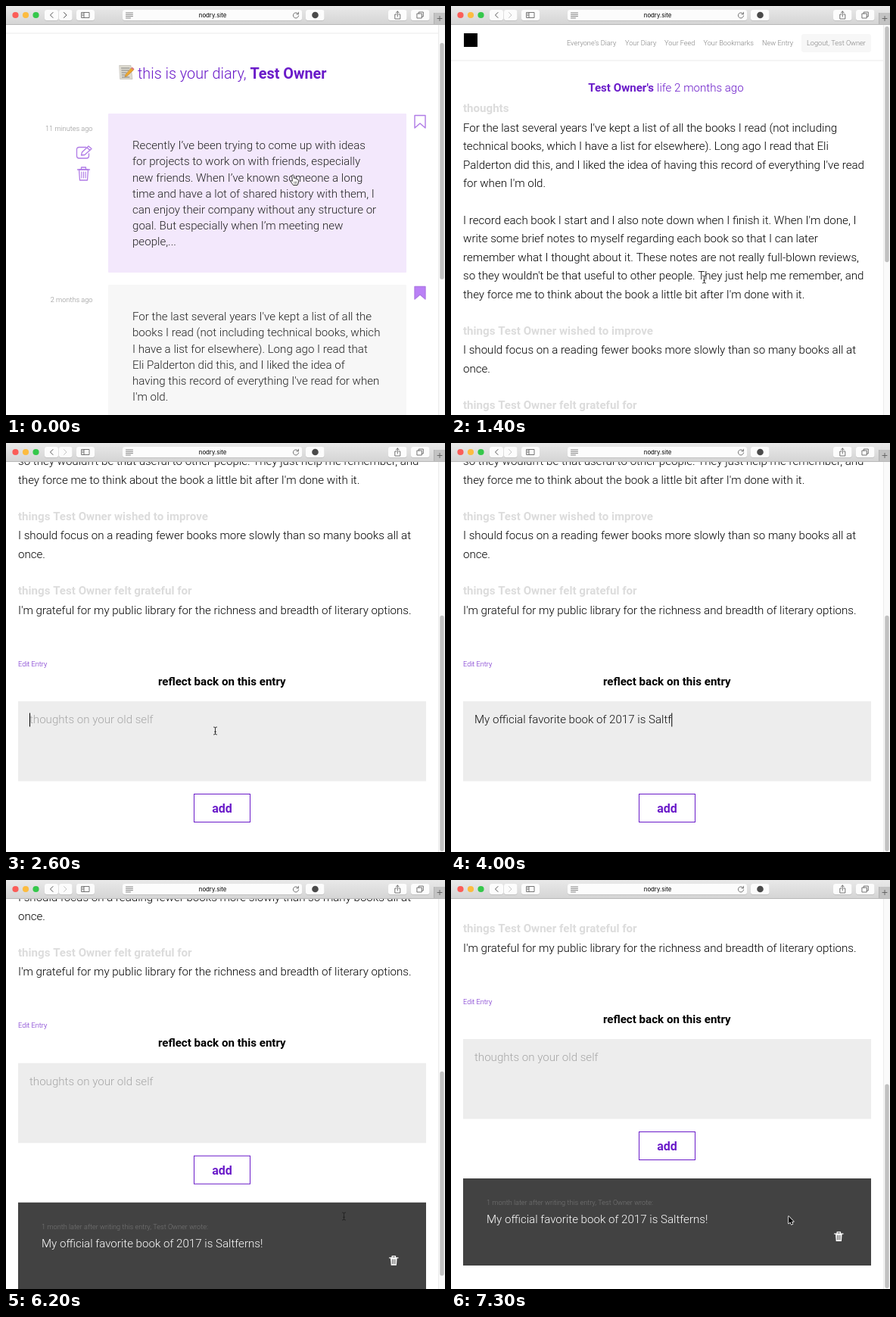
Write an HTML page with a canvas that moves like this. It is 580 by 540 pixels and loops after 7.4 s.

```html
<!DOCTYPE html>
<html lang="en">
<head>
<meta charset="utf-8">
<title>Diary demo</title>
<style>
html, body { margin: 0; width: 100%; height: 100%; overflow: hidden; background: #fff; }
canvas { display: block; width: 580px; height: 540px; }
</style>
</head>
<body>
<canvas id="stage"></canvas>
<script>
const W = 580, H = 540, LOOP = 7400, STEP = 100, TOP = 25, PAGE_W = 571;
const canvas = document.getElementById('stage');
const ctx = canvas.getContext('2d');
const dpr = window.devicePixelRatio || 1;
canvas.width = W * dpr;
canvas.height = H * dpr;

const USER = 'Test Owner', TITLE = 'Saltferns';
const PURPLE = '#6a1bc9', LILAC = '#b07be6', SIZE = 15.1, SMALL = 9.2;
const NOTE = `My official favorite book of 2017 is ${TITLE}!`;
const PLACEHOLDER = 'thoughts on your old self';

const DIARY = [
  { y: 178, h: 210, age: '11 minutes ago', saved: false, lines: [
    'Recently I’ve been trying to come up with ideas',
    'for projects to work on with friends, especially',
    'new friends. When I’ve known someone a long',
    'time and have a lot of shared history with them, I',
    'can enjoy their company without any structure or',
    'goal. But especially when I’m meeting new',
    'people,...'] },
  { y: 404, h: 189, age: '2 months ago', saved: true, lines: [
    "For the last several years I've kept a list of all the",
    'books I read (not including technical books, which',
    'I have a list for elsewhere). Long ago I read that',
    'Eli Palderton did this, and I liked the idea of',
    "having this record of everything I've read for when",
    "I'm old."] }
];
const THOUGHTS = [
  "For the last several years I've kept a list of all the books I read (not including",
  'technical books, which I have a list for elsewhere). Long ago I read that Eli',
  "Palderton did this, and I liked the idea of having this record of everything I've read",
  "for when I'm old.",
  '',
  "I record each book I start and I also note down when I finish it. When I'm done, I",
  'write some brief notes to myself regarding each book so that I can later',
  'remember what I thought about it. These notes are not really full-blown reviews,',
  "so they wouldn't be that useful to other people. They just help me remember, and",
  "they force me to think about the book a little bit after I'm done with it."
];

const DIARY_SCROLL = [[0, 36], [400, 76]];
const ENTRY_SCROLL = [[1600, 0], [2300, 332], [5800, 332], [6400, 466], [6600, 463]];
const POINTER = [
  [0, 380, 229], [200, 380, 229], [700, 334, 361], [1600, 334, 361],
  [2300, 276, 380], [5000, 276, 380], [5400, 300, 484], [5700, 306, 484],
  [5800, 366, 459], [6200, 446, 444]
];

// Eased value of column c in a list of [time, value, ...] keys.
function track(keys, t, c = 1) {
  if (t <= keys[0][0]) return keys[0][c];
  for (let i = 1; i < keys.length; i++) {
    const a = keys[i - 1], b = keys[i];
    if (t < b[0]) {
      const p = (t - a[0]) / (b[0] - a[0]);
      return a[c] + (b[c] - a[c]) * p * p * (3 - 2 * p);
    }
  }
  return keys[keys.length - 1][c];
}

const clamp = (v, lo, hi) => Math.min(hi, Math.max(lo, v));

// Text is placed by the middle of its capitals.
function text(s, x, mid, { size = SIZE, weight = 300, color = '#000', align = 'left', family = 'Roboto' } = {}) {
  ctx.font = `${weight} ${size}px ${family}, sans-serif`;
  ctx.textAlign = align;
  ctx.fillStyle = color;
  ctx.fillText(s, x, mid + size * 0.355);
  return ctx.measureText(s).width;
}

function rect(x, y, w, h, fill, r = 0) {
  ctx.fillStyle = fill;
  ctx.beginPath();
  ctx.roundRect(x, y, w, h, r);
  ctx.fill();
}

function disc(x, y, r, fill) {
  ctx.fillStyle = fill;
  ctx.beginPath();
  ctx.arc(x, y, r, 0, 7);
  ctx.fill();
}

function shape(d, x, y, { fill, stroke, width = 1 } = {}) {
  const path = new Path2D(d);
  ctx.save();
  ctx.translate(x, y);
  ctx.lineJoin = ctx.lineCap = 'round';
  if (fill) { ctx.fillStyle = fill; ctx.fill(path); }
  if (stroke) { ctx.strokeStyle = stroke; ctx.lineWidth = width; ctx.stroke(path); }
  ctx.restore();
}

function drawToolbar(entryOpen) {
  const bar = ctx.createLinearGradient(0, 0, 0, TOP);
  bar.addColorStop(0, '#e9e9e9');
  bar.addColorStop(1, '#d4d4d4');
  rect(0, 0, W, TOP, bar);
  rect(0, 24, W, 1, '#b9b9b9');
  ['#fb5d58', '#fcbc40', '#35c84b'].forEach((c, i) => disc(12.5 + i * 13.5, 12, 4.1, c));

  [[51, 18], [70, 17.5], [93, 24], [154, 237], [396, 24.5], [505, 24.5], [535, 24.5]].forEach(([x, w]) => {
    rect(x, 5.5, w, 14.5, '#c2c2c2', 3);
    rect(x, 5, w, 14, '#fcfcfc', 3);
  });
  const line = { stroke: '#555', width: 1 };
  shape('M2 -3.5L-1.5 0L2 3.5', 60, 12, line);
  shape('M-2 -3.5L1.5 0L-2 3.5', 78.5, 12, { stroke: entryOpen ? '#c4c4c4' : '#555' });
  shape('M-5 -3.5H5V3.5H-5ZM-2 -3.5V3.5M-4 -1.5H-3M-4 .5H-3', 105, 12, { stroke: '#666', width: 0.9 });
  shape('M0 0H9M0 2.3H9M0 4.6H9M0 6.9H6', 158.5, 9, { stroke: '#777', width: 0.9 });
  shape('M3.2 -1.6A3.6 3.6 0 1 0 3.6 .6M3.4 -4V-1.4H.9', 383, 12.3, { stroke: '#666', width: 0.9 });
  text('nodry.site', 273, 12.2, { size: 7.8, weight: 400, align: 'center', family: 'Inter' });
  disc(408.5, 12, 4.3, '#4a4a4a');
  shape('M-1.5 -1H-3.5V5H3.5V-1H1.5M0 2V-5M-2 -3L0 -5L2 -3', 517.3, 12, { stroke: '#666', width: 0.9 });
  shape('M-4 -2H2V4H-4ZM-2 -2V-4H4V2H2', 547.3, 12, { stroke: '#666', width: 0.9 });
  rect(565, 9, 15, 15, '#c3c3c3');
  rect(565, 9, 0.8, 15, '#adadad');
  shape('M-3 0H3M0 -3V3', 573, 16.5, { stroke: '#666' });
}

function drawScrollbar(scroll, docH) {
  rect(PAGE_W, TOP, W - PAGE_W, H - TOP, '#fafafa');
  rect(PAGE_W, TOP, 0.8, H - TOP, '#e7e7e7');
  const scale = 512 / docH;
  const y = 27 + scroll * scale;
  rect(573.3, y, 5.4, Math.min(515 * scale, 539 - y), '#c1c1c1', 2.7);
}

function drawHeader() {
  rect(17, 36, 18, 18, '#000');
  const nav = { size: SMALL, color: '#808080' };
  rect(463, 37, 92, 24, '#f7f7f7', 3);
  [["Everyone's Diary", 153], ['Your Diary', 230], ['Your Feed', 282], ['Your Bookmarks', 333.5],
    ['New Entry', 411], [`Logout, ${USER}`, 470]].forEach(([s, x]) => text(s, x, 49, nav));
  rect(0, 71.5, PAGE_W, 1, '#ececec');
}

function trash(x, y, color, solid) {
  shape('M-6 -5.5L-5 8.5H5L6 -5.5Z', x, y, solid ? { fill: color } : { stroke: color, width: 1.3 });
  shape('M-8 -5.5H8M-3 -6V-8.5H3V-6', x, y, { stroke: color, width: solid ? 1.8 : 1.3 });
  shape('M-2.6 -2.5V5.5M0 -2.5V5.5M2.6 -2.5V5.5', x, y, { stroke: solid ? '#424242' : color, width: 1.1 });
}

function memo(x, y) {
  shape('M0 1H15L17 19H1Z', x, y, { fill: '#dedbd0', stroke: '#b9b6ad', width: 0.6 });
  shape('M2.5 4.5H13M2.8 7.5H12M3 10.5H9M3.2 13.5H7M3.4 16.5H13', x, y, { stroke: '#777', width: 0.9 });
  shape('M15.5 4.5L18.5 7L10 15L7 16L8 13Z', x, y, { fill: '#eda72d', stroke: '#a8702a', width: 0.5 });
  shape('M15.5 4.5L17 3.3L19.5 5.8L18.5 7Z', x, y, { fill: '#dc6f7c' });
}

function drawDiary(t) {
  drawHeader();
  memo(150, 113.5);
  const w = text('this is your diary, ', 174, 124.5, { size: 19.8, color: PURPLE });
  text(USER, 174 + w, 124.5, { size: 19.8, weight: 700, color: PURPLE });

  const scroll = track(DIARY_SCROLL, t);
  const py = track(POINTER, t, 2) + scroll;
  for (const { y, h, age, saved, lines } of DIARY) {
    const hover = py >= y && py < y + h;
    rect(135, y, 394, h, hover ? '#f3e8fc' : '#f7f7f7', 1);
    lines.forEach((s, i) => text(s, 167, y + 42 + i * 21.1, { color: '#222' }));
    text(age, 114.5, y + 20, { size: SMALL, color: '#8f8f8f', align: 'right' });
    shape('M0 0H14V16.5L7 10.5L0 16.5Z', 540, y + 2.5, {
      stroke: LILAC, width: 1.4, fill: saved ? '#ba80f6' : '#fff' });
    if (hover) {
      const pen = { stroke: LILAC, width: 1.3 };
      shape('M12 1.5H3Q0 1.5 0 4.5V13Q0 16 3 16H13Q16 16 16 13V10', 93.5, y + 43, pen);
      shape('M6 12L7 8L15.5 0L19.5 3.5L10.5 11.5ZM13.5 2L17.5 5.5', 93.5, y + 43, pen);
      trash(102.5, y + 79.5, LILAC, false);
    }
  }
  rect(135, 609, 394, 190, '#f7f7f7', 1);
}

function drawField(t) {
  rect(16, 673, 539, 105.5, '#ededed');
  const sent = t >= 5700;
  const count = sent ? 0 : clamp(Math.round((t - 2600) * 0.03), 0, NOTE.length);
  const typed = NOTE.slice(0, count);
  const w = text(typed || PLACEHOLDER, 31, 697, { color: count ? '#111' : '#a6a6a6' });
  const typing = t < 4300;
  const focused = t >= 2400 && !sent;
  if (focused && (typing || Math.floor(t / 200) % 2)) {
    rect(31 + (count ? w : 0), 688.5, 1, 18, '#000');
  }
}

function drawButton(t) {
  const hover = t >= 5300 && t <= 5900;
  rect(248, 795, 75, 38, hover ? '#781de6' : PURPLE);
  if (!hover) rect(249, 796, 73, 36, '#fff');
  text('add', 285.5, 814.3, { size: 16, weight: 700, color: hover ? '#fff' : PURPLE, align: 'center' });
}

function drawReply(t) {
  ctx.save();
  ctx.globalAlpha = clamp((t - 5760) / 400, 0, 1);
  rect(16, 857, 539, 115, '#424242');
  text(`1 month later after writing this entry, ${USER} wrote:`, 47, 889, { size: SMALL, color: '#777' });
  text(NOTE, 47, 910.7, { color: '#fff' });
  ctx.translate(512.3, 934);
  ctx.scale(0.72, 0.72);
  trash(0, 0, '#fff', true);
  ctx.restore();
}

function drawEntry(t) {
  drawHeader();
  text(`${USER}'s`, 268, 108, { weight: 700, color: PURPLE, align: 'right' });
  text('life 2 months ago', 272, 108, { color: PURPLE });
  const head = (s, y) => text(s, 16, y, { weight: 700, color: '#dcdcdc' });
  head('thoughts', 134.5);
  THOUGHTS.forEach((s, i) => text(s, 16, 160.3 + i * 24.45));
  head(`things ${USER} wished to improve`, 428.5);
  text('I should focus on a reading fewer books more slowly than so many books all at', 16, 454);
  text('once.', 16, 478.5);
  head(`things ${USER} felt grateful for`, 526.5);
  text("I'm grateful for my public library for the richness and breadth of literary options.", 16, 552.3);
  text('Edit Entry', 16, 623.3, { size: SMALL, color: PURPLE });
  text('reflect back on this entry', 285.3, 646.3, { weight: 700, align: 'center' });
  drawField(t);
  drawButton(t);
  if (t >= 5700) drawReply(t);
}

function drawPointer(t) {
  if (t >= 2700 && t < 5000) return;
  const x = track(POINTER, t), y = track(POINTER, t, 2);
  const beam = (t >= 1000 && t < 5300) || (t >= 6200 && t < 6700);
  if (t < 1000) {
    shape('M-2 -5.5Q-.5 -7 .5 -5V-1.5Q2 -2.5 2.8 -1Q4.5 -1.5 5 0Q6.5 0 6.5 2V4Q6 6 5 7.5H-.5Q-2 5.5 -4 2.5Q-4 .8 -2 2Z',
      x, y, { fill: '#fff', stroke: '#333', width: 1 });
    shape('M.8 3V5.5M2.5 3V5.5M4.2 3V5.5', x, y, { stroke: '#555', width: 0.7 });
  } else if (beam) {
    shape('M-2 -5Q0 -5 0 -3.8Q0 -5 2 -5M0 -4V4M-2 5Q0 5 0 3.8Q0 5 2 5M-1 1.2H1', x + 0.5, y, { stroke: '#222', width: 0.9 });
  } else {
    shape('M0 0V9.5L2.2 7.5L3.8 10.8L5.4 10L3.9 7H6.8Z', x, y, { stroke: '#fff', width: 1.5, fill: '#000' });
    shape('M0 0V9.5L2.2 7.5L3.8 10.8L5.4 10L3.9 7H6.8Z', x, y, { fill: '#000' });
  }
}

function draw(t) {
  ctx.setTransform(dpr, 0, 0, dpr, 0, 0);
  rect(0, 0, W, H, '#fff');
  const entryOpen = t >= 1000;
  const scroll = track(entryOpen ? ENTRY_SCROLL : DIARY_SCROLL, t);
  ctx.save();
  ctx.beginPath();
  ctx.rect(0, TOP, PAGE_W, H - TOP);
  ctx.clip();
  ctx.translate(0, -scroll);
  (entryOpen ? drawEntry : drawDiary)(t);
  ctx.restore();
  drawScrollbar(scroll, !entryOpen ? 845 : t < 5700 ? 847 : 978);
  drawToolbar(entryOpen);
  drawPointer(t);
}

const start = performance.now();
function tick() {
  const t = (performance.now() - start) % LOOP;
  draw(Math.floor(t / STEP) * STEP);
  requestAnimationFrame(tick);
}
tick();
</script>
</body>
</html>
```
